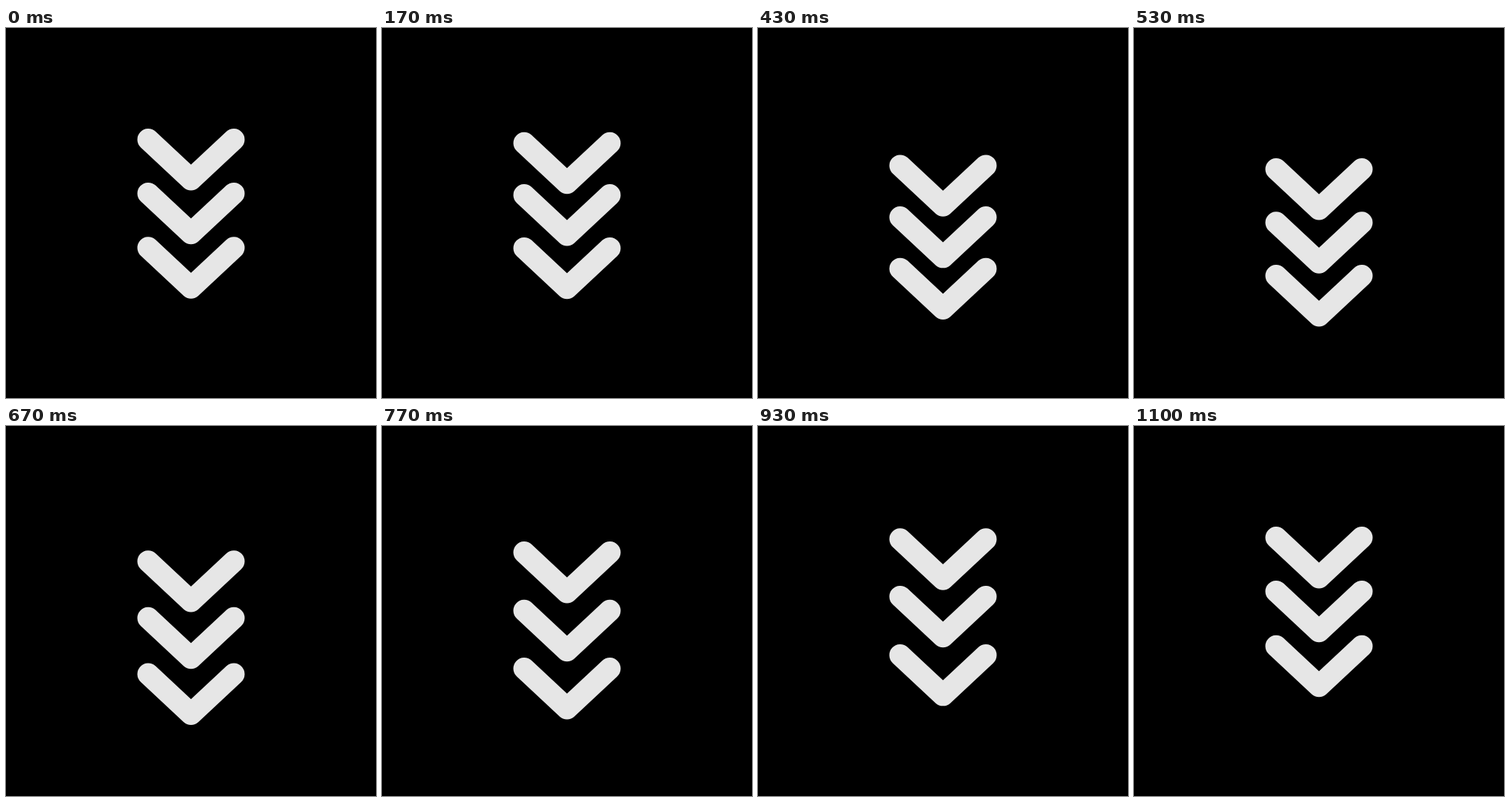
These frames come from a looping animation (500 px wide and 500 px high, 1130 ms). An HTML page without scripts:

```html
<!DOCTYPE html>
<html lang="en">
<head>
<meta charset="utf-8">
<title>Scroll down arrows</title>
<style>
  @property --tick {
    syntax: "<number>";
    inherits: true;
    initial-value: 0;
  }

  html, body {
    margin: 0;
    width: 100%;
    height: 100%;
    overflow: hidden;
    background: #000;
  }

  svg {
    display: block;
    width: 100%;
    height: 100%;
    fill: none;
    stroke: #e6e6e6;
    stroke-width: 29.4;
    stroke-linecap: round;
    stroke-linejoin: round;
    animation: tick 1130ms steps(34) -3ms infinite;
  }

  @keyframes tick {
    from { --tick: 0; }
    to { --tick: 34; }
  }

  /* Each arrow eases down 40px in 14 ticks, then eases back up. */
  .arrow {
    --down: clamp(0, (var(--tick) - var(--start)) / 14, 1);
    --up: clamp(0, (var(--tick) - var(--start) - 14) / var(--back), 1);
    --ease-down: calc(var(--down) * var(--down) * (3 - 2 * var(--down)));
    --ease-up: calc(var(--up) * var(--up) * (3 - 2 * var(--up)));
    transform: translateY(calc(40px * (var(--ease-down) - var(--ease-up))));
  }

  .top    { --start: 2; --back: 14; }
  .middle { --start: 3; --back: 15; }
  .bottom { --start: 4; --back: 16; }
</style>
</head>
<body>
<svg viewBox="0 0 500 500">
  <path class="arrow top" d="M192.2 150.8 250 204.8 307.8 150.8"/>
  <path class="arrow middle" d="M192.2 223.6 250 277.6 307.8 223.6"/>
  <path class="arrow bottom" d="M192.2 297 250 351 307.8 297"/>
</svg>
</body>
</html>
```
